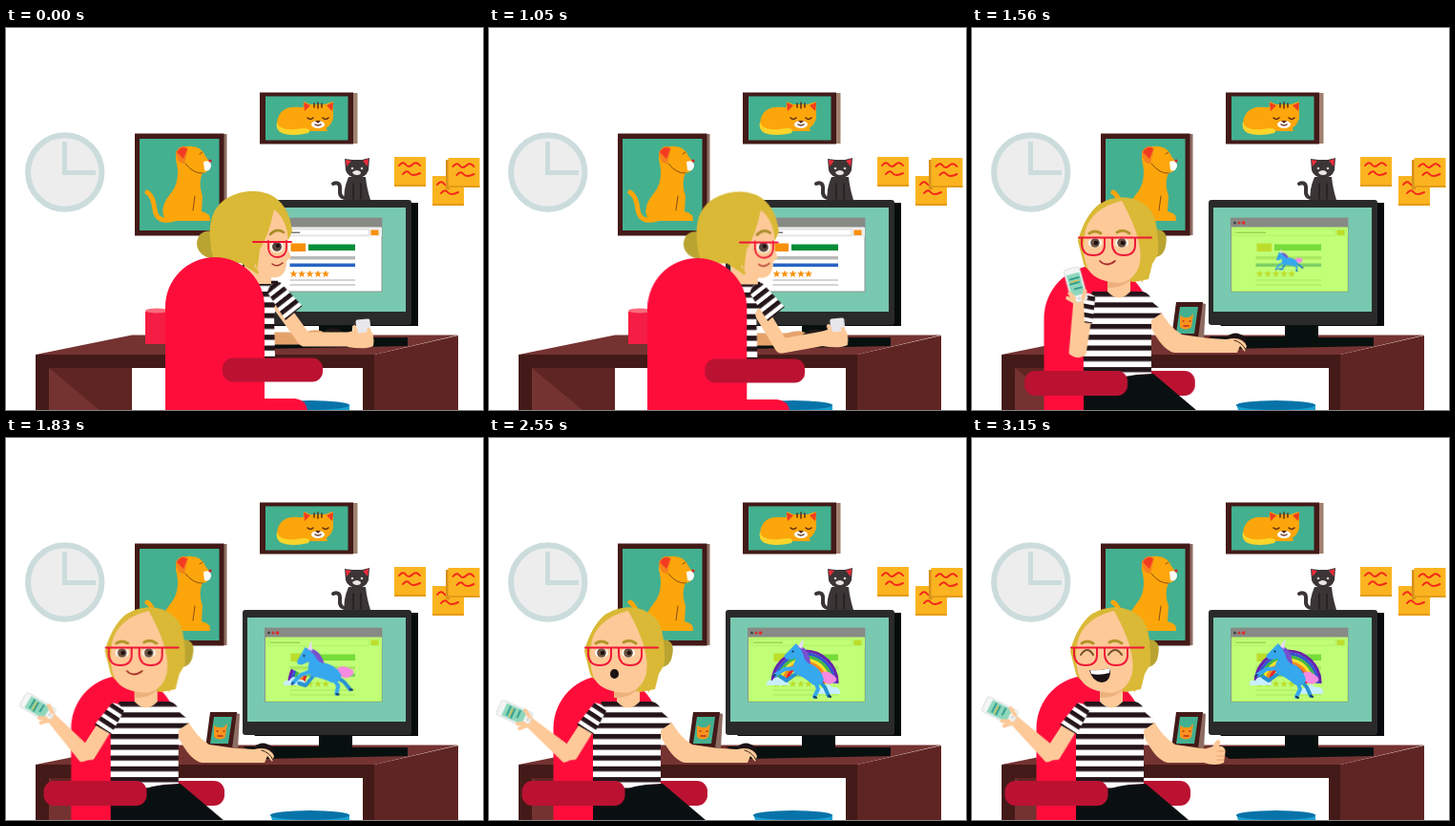
Write an HTML page that moves like this. It is 500 px wide and 400 px high and loops after 4500 ms.

```html
<!DOCTYPE html>
<html lang="en">
<head>
<meta charset="utf-8">
<title>Desk surprise</title>
<style>
html, body { margin: 0; width: 100%; height: 100%; overflow: hidden; background: #fff; }
svg { display: block; width: 100vw; height: 100vh; }
.anim { animation: 4.5s linear infinite; }
.line { fill: none; stroke-linecap: round; stroke-linejoin: round; }
.skin { fill: #fdc998; }
.limb { stroke: #fdc998; }
.hair { fill: #d9b936; }
.red { fill: #fe0d3b; }
.rest { fill: #bb1232; }
.ink { fill: #1b1215; }
.cut { animation-timing-function: step-end; }

/* typing, seen from behind */
.back { animation-name: back; }
@keyframes back {
  0%, 26.66% { opacity: 1 }
  26.67%, 100% { opacity: 0 }
}
.backChair { animation-name: backChair; }
@keyframes backChair {
  0% { transform: none; animation-timing-function: ease-in-out }
  12%, 20.67% { transform: translate(3.5px, 0); animation-timing-function: ease-in }
  23.33% { transform: translate(-.5px, 1px) }
  26.67%, 100% { transform: translate(-29px, 1px) }
}
.backHead { animation-name: backHead; }
@keyframes backHead {
  0% { transform: none; animation-timing-function: ease-in-out }
  13%, 20.67% { transform: translate(7px, 0); animation-timing-function: ease-in }
  23.33% { transform: translate(4px, .5px) }
  26.67%, 100% { transform: translate(-25px, 1px) }
}
.backArm { animation-name: backArm; }
@keyframes backArm {
  0% { d: path("M289 293 L313 326 L366 326"); animation-timing-function: ease-in-out }
  13.33%, 20.67% { d: path("M292 300 L309 333 L362 327"); animation-timing-function: ease-in }
  23.33% { d: path("M287 300 L307 333 L357 324") }
  26.67%, 100% { d: path("M257 300 L277 333 L327 324") }
}
.backHand { animation-name: backHand; }
@keyframes backHand {
  0% { transform: none; animation-timing-function: ease-in-out }
  13.33%, 20.67% { transform: translate(-3px, 1px) }
  23.33% { transform: translate(-9px, -1px) }
  26.67%, 100% { transform: translate(-39px, -1px) }
}

/* facing the room */
.front { animation-name: front; }
@keyframes front {
  0%, 26.66% { opacity: 0 }
  26.67%, 100% { opacity: 1 }
}
.frontBody { animation-name: frontBody; }
@keyframes frontBody {
  0%, 26.67% { transform: translateX(70px) }
  29.33% { transform: translateX(27px) }
  32% { transform: translateX(14px) }
  36% { transform: translateX(5px) }
  40.67% { transform: translateX(.7px) }
  44%, 100% { transform: none }
}
.frontRest { animation-name: frontRest; }
@keyframes frontRest {
  0%, 26.67% { transform: translateX(115px) }
  29.33% { transform: translateX(57px) }
  32% { transform: translateX(32px) }
  36% { transform: translateX(15px) }
  40.67% { transform: translateX(5px) }
  44%, 100% { transform: none }
}
.farRest { animation-name: farRest; }
@keyframes farRest {
  0%, 26.67% { transform: translateX(30px) }
  29.33% { transform: translateX(9px) }
  40.67%, 100% { transform: none }
}
.deskArm { animation-name: deskArm; }
@keyframes deskArm {
  0%, 26.67% { transform: translateX(50px) }
  29.33% { transform: translateX(18px) }
  32% { transform: translateX(10px) }
  40.67%, 100% { transform: none }
}
.head { animation-name: head; }
@keyframes head {
  0%, 40.67% { transform: none }
  46%, 58% { transform: translateX(-3px) }
  66%, 100% { transform: none }
}
.upper { animation-name: upper; }
@keyframes upper {
  0%, 30.67% { transform: rotate(-10deg); animation-timing-function: ease-in-out }
  39%, 100% { transform: rotate(33deg) }
}
.fore { animation-name: fore; }
@keyframes fore {
  0%, 30.67% { transform: rotate(205deg); animation-timing-function: ease-in-out }
  40.67% { transform: rotate(105deg) }
  44%, 56.67% { transform: rotate(98deg) }
  66%, 100% { transform: rotate(101deg) }
}
.smile { animation-name: smile; }
@keyframes smile { 0% { opacity: 1 } 46.67%, 100% { opacity: 0 } }
.gasp { animation-name: gasp; }
@keyframes gasp { 0% { opacity: 0 } 46.67% { opacity: 1 } 60%, 100% { opacity: 0 } }
.laugh { animation-name: laugh; }
@keyframes laugh { 0% { opacity: 0 } 60%, 100% { opacity: 1 } }
.open { animation-name: open; }
@keyframes open { 0% { opacity: 1 } 60%, 100% { opacity: 0 } }
.flat { animation-name: flat; }
@keyframes flat { 0% { opacity: 1 } 64.4%, 100% { opacity: 0 } }
.fist { animation-name: fist; }
@keyframes fist { 0% { opacity: 0 } 64.4%, 100% { opacity: 1 } }
.thumb { animation-name: thumb; }
@keyframes thumb {
  0%, 68% { transform: translateY(8px) }
  70%, 100% { transform: none }
}

/* on the screen */
.tint { animation-name: tint; }
@keyframes tint { 0%, 24.67% { opacity: 0 } 27.5%, 100% { opacity: .7 } }
.unicorn { animation-name: unicorn; transform-origin: 332px 245px; }
@keyframes unicorn {
  0%, 33% { transform: rotate(-30deg) scale(0); animation-timing-function: ease-out }
  38.5% { transform: rotate(-18deg) scale(1) }
  40.67% { transform: rotate(-15deg) }
  48% { transform: rotate(2deg) }
  56.67% { transform: translateX(1px) rotate(0deg) }
  62% { transform: translateY(-1px) rotate(-3deg) }
  68%, 100% { transform: none }
}
.bow { animation-name: bow; stroke-dasharray: 1 2; }
@keyframes bow {
  0%, 39% { stroke-dashoffset: 1.01 }
  40.67% { stroke-dashoffset: .86 }
  48%, 100% { stroke-dashoffset: 0 }
}
.cloud { animation-name: cloud; }
@keyframes cloud { 0%, 38.5% { opacity: 0 } 40.67%, 100% { opacity: 1 } }
.late { animation-name: late; }
@keyframes late { 0%, 46% { opacity: 0 } 48%, 100% { opacity: 1 } }
</style>
</head>
<body>
<svg viewBox="0 0 500 400" preserveAspectRatio="none">
<defs>
  <pattern id="stripes" width="20" height="11.3" y="276" patternUnits="userSpaceOnUse">
    <rect width="20" height="11.3" fill="#fff"/><rect width="20" height="5.3" fill="#24151a"/>
  </pattern>
  <pattern id="cuff" width="30" height="9" y="-8" patternUnits="userSpaceOnUse">
    <rect width="30" height="9" fill="#fff"/><rect width="30" height="4.8" fill="#24151a"/>
  </pattern>
  <path id="star" d="M0-4 1.1-1.3 4-1.2 1.7.6 2.5 3.5 0 1.8-2.5 3.5-1.7.6-4-1.2-1.1-1.3Z"/>
  <g id="note">
    <rect width="33" height="31" fill="#fbb41f"/><path d="M0 29H33V31H0Z" fill="#e59a17"/>
    <path class="line" stroke="#f3261b" stroke-width="2" d="M5 9Q9 4 12 8T19 8T27 9M9 18Q13 13 16 17T27 17"/>
  </g>
</defs>

<!-- wall -->
<circle cx="61.7" cy="151" r="38.7" fill="#ededed" stroke="#ccdcdc" stroke-width="6"/>
<path d="M61.5 119V151.500H94" fill="none" stroke="#ccdcdc" stroke-width="5"/>

<path d="M228 111H231.500V217H228Z" fill="#8d6c62"/>
<path d="M135 110.500H228.500V217.500H135Z" fill="#431a18"/>
<path d="M140 116H223.500V212H140Z" fill="#43b090"/>
<g fill="#fca60b">
  <path class="line" stroke="#fca60b" stroke-width="5" d="M176 200Q158 205 156 190T148 172"/>
  <path d="M178 138Q177 126 189 124Q204 122 209 134L214 141Q216 150 206 152Q201 162 206 176L205 192Q215 194 214 202H168Q159 190 172 174Q184 160 178 138Z"/>
  <path d="M178 130Q184 120 191 126L187 142Q179 143 178 130Z" fill="#f5811d"/>
  <path d="M179 130Q185 122 190 127L186 137Z" fill="#f33b22"/>
</g>
<path d="M207 140Q215 137 215 145Q213 151 208 149Z" fill="#fff"/>
<path class="line" stroke="#8c4a12" d="M203 132 206 130M188 142Q197 153 206 152M198 176 196 191"/>
<circle cx="214" cy="139" r="1.6" fill="#d8232a"/>

<path d="M363 68H368.500V121H363Z" fill="#a0806f"/>
<path d="M266 67.500H364V121.500H266Z" fill="#431a18"/>
<path d="M272 71.500H358.500V117.500H272Z" fill="#43b090"/>
<path d="M284 104Q283 80 309 83Q330 83 337 108H297Q286 112 284 104Z" fill="#fca60b"/>
<path d="M284 98Q286 108 304 106Q322 103 317 110Q300 114 289 110Q282 106 284 98Z" fill="#fbd52a"/>
<path d="M311 90 312 77 319 80H334L343 77 343 94Q340 107 326 107Q312 105 311 90Z" fill="#fca60b"/>
<path d="M312 78 319 81 313 87ZM343 78 336 81 342 87Z" fill="#f33b22"/>
<ellipse cx="327" cy="101" rx="7" ry="4" fill="#fff"/>
<path class="line" stroke="#5b2913" stroke-width="1.5" d="M323 79V83M327 78V84M331 79V83M316 94Q319 97 322 94M332 94Q335 97 338 94M324 101Q327 103 330 101"/>
<path d="M324 97H330L327 100Z" fill="#5b2913"/>

<use href="#note" x="407" y="135"/>
<use href="#note" x="447" y="155"/>
<path d="M461 138H465V169H461Z" fill="#d7901b"/>
<use href="#note" x="463.500" y="136"/>

<!-- desk -->
<path d="M31 342 132 321.500H474L386 342Z" fill="#743331"/>
<path d="M31 342H386V400H374V356H45V400H31Z" fill="#431a18"/>
<path d="M45 356H132V400H45ZM386 342 474 322V400H386Z" fill="#5f2522"/>
<path d="M45 356 98 400H45Z" fill="#743331"/>
<path d="M146 297H170V331H146Z" fill="#f51d43"/>
<ellipse cx="158" cy="296" rx="12" ry="2.500" fill="#fb6b7c"/>
<path d="M277 394H360V400H279Z" fill="#1aa0d0"/>
<ellipse cx="318.500" cy="395" rx="41.500" ry="5" fill="#0873a8"/>

<!-- monitor -->
<path d="M424 183H432V312H260Z" fill="#070b0b"/>
<path d="M328 310H363V324H421V333L270 336 248 323H328Z" fill="#07100f"/>
<rect x="248" y="180" width="177" height="131" rx="3" fill="#2a2a2a"/>
<path d="M253 188H419V297H253Z" fill="#78c9b0"/>
<rect x="271.500" y="199" width="122.500" height="77" fill="#fff" stroke="#8a9690"/>
<path d="M272 209H394V218.500H272Z" fill="#eee"/>
<path d="M276 211H380V217H276Z" fill="#fff" stroke="#ccc" stroke-width=".6"/>
<path d="M277 213.500H308V215H277Z" fill="#777"/>
<path d="M298.500 225.500H314V234H298.500ZM382.500 211.500H390.500V217H382.500Z" fill="#f8900a"/>
<path d="M317 226.500H366V233H317Z" fill="#068d38"/>
<path d="M297.500 239H366V242.500H297.500Z" fill="#b8b8b8"/>
<path d="M297.500 246.500H366V250H297.500Z" fill="#2863c4"/>
<path d="M297.500 263H366V265H297.500ZM297.500 268H366V270H297.500Z" fill="#d4d4d4"/>
<g fill="#f8900a">
  <use href="#star" x="301.500" y="257.500"/><use href="#star" x="310" y="257.500"/><use href="#star" x="318.500" y="257.500"/><use href="#star" x="327" y="257.500"/><use href="#star" x="335" y="257.500"/>
</g>
<path class="anim tint" d="M272 208H394V276H272Z" fill="#a5ff3c"/>
<path d="M271 199H394V208.500H271Z" fill="#878a85"/>
<circle cx="275.500" cy="204" r="1.500" fill="#444"/><circle cx="280" cy="204" r="1.500" fill="#c33"/><circle cx="284.500" cy="204" r="1.700" fill="#e22"/>

<g class="line" stroke-width="3.200" style="stroke-linecap:butt">
  <path class="anim bow" pathLength="1" stroke="#6a20b0" d="M297 257A34 34 0 0 1 365 257"/>
  <path class="anim bow" pathLength="1" stroke="#3553d4" d="M300 257A31 31 0 0 1 362 257"/>
  <path class="anim bow" pathLength="1" stroke="#42b749" d="M303 257A28 28 0 0 1 359 257"/>
  <path class="anim bow" pathLength="1" stroke="#f5e22b" d="M306 257A25 25 0 0 1 356 257"/>
  <path class="anim bow" pathLength="1" stroke="#f68b1f" d="M309 257A22 22 0 0 1 353 257"/>
  <path class="anim bow" pathLength="1" stroke="#e8262b" d="M312 257A19 19 0 0 1 350 257"/>
</g>
<path class="anim cloud" fill="#c8efff" d="M291 259Q290 253 297 254Q301 247 307 253Q315 252 314 259Z"/>
<path class="anim late" fill="#c8efff" d="M344 268Q342 262 349 262Q355 255 360 261Q369 260 368 268Z"/>
<g class="anim unicorn">
  <path fill="#f58ae0" d="M344 250Q350 241 358 247Q367 252 361 256Q355 260 350 255Z"/>
  <g class="line" stroke="#2590d3" stroke-width="4">
    <path d="M322 246 311 254 305 250M345 254 351 261 355 270"/>
  </g>
  <g class="line" stroke="#35a8ee" stroke-width="4">
    <path d="M321 241 309 242 299 248M341 255 344 263 340 271"/>
  </g>
  <path fill="#35a8ee" d="M309 227 318 218 321 215 324 219Q333 224 333 235Q347 240 350 253Q347 262 338 258Q329 250 320 247Q315 241 321 231L313 232Q307 231 309 227Z"/>
  <path fill="#7750cf" d="M322 217Q335 219 336 237Q331 235 329 229Q328 223 322 217Z"/>
  <path fill="#e7d8ff" d="M323 218 329 210 327 221Z"/>
  <circle cx="317.500" cy="223.500" r="1" fill="#123"/>
  <path class="line" stroke="#123a66" stroke-width="2" d="M299 248 297.500 249M340 271 342 272M355 270 357 271"/>
</g>

<!-- toy cat on the monitor -->
<path class="line" stroke="#3b3536" stroke-width="4" d="M361 178Q349 180 350 170T343 163"/>
<path fill="#3b3536" d="M359 156H377Q378 167 382 180H355Q353 170 359 156Z"/>
<path fill="#3b3536" d="M355 137 363 138H373L381 136 380 149Q377 157 368 157Q358 156 356 149Z"/>
<path fill="#ee2b3a" d="M356 138 362 139 357 145ZM380 137 374 139 379 145Z"/>
<path fill="#ece7e5" d="M363 151Q368 147 372 151Q372 154 368 154T363 151Z"/>
<circle cx="363" cy="147" r="1.300" fill="#d8d0c8"/><circle cx="373" cy="147" r="1.300" fill="#d8d0c8"/>
<path class="line" stroke="#171314" d="M364 163V179M372 163V179"/>

<!-- photo on the desk -->
<path d="M241 288 245 289 243 326 236 323Z" fill="#8d6c62"/>
<path d="M214 287H242L237 325H209Z" fill="#431a18"/>
<path d="M218 292H237L233 320H214Z" fill="#43b090"/>
<path d="M218 301 222 303H228L232 299 230 313Q224 318 218 313Z" fill="#f7941d"/>
<path class="line" stroke="#c2281c" stroke-width="1.300" d="M221 307H222M228 307H229M222 312H227"/>

<!-- back view -->
<g class="anim cut back">
  <g class="anim backChair">
    <path class="line" stroke="#e5a36c" stroke-width="13" d="M276 325H314"/>
    <path class="line" stroke="#e5a36c" stroke-width="7" d="M314 322Q326 317 334 323"/>
    <path class="line" stroke="#241a18" stroke-width="3" d="M331 321Q342 312 352 319"/>
    <path fill="url(#stripes)" d="M262 264 284 262Q290 278 281 300L282 346H262Z"/>
  </g>
  <path class="line limb anim backArm" stroke-width="15" d="M289 293 L313 326 L366 326"/>
  <g class="anim backHand">
    <path class="skin" d="M358 319 369 315 381 315Q387 322 385 333Q377 337 358 334Z"/>
    <rect x="367" y="305" width="15" height="14" rx="2" fill="#e7e7ec" transform="rotate(-6 374 312)"/>
    <path class="line limb" stroke-width="4" d="M365 313 368 321M380 316 383 323"/>
  </g>
  <g class="anim backChair">
    <g transform="translate(284 275) rotate(-38)"><path fill="url(#cuff)" d="M-9-5Q0-12 8-5L11 29-12 30Z"/></g>
  </g>
  <g class="anim backHead">
    <path fill="#b9a431" d="M219 213Q201 210 200 226Q201 239 218 242Z"/>
    <path class="skin" d="M250 235H278V268H250Z"/>
    <path class="hair" d="M214 222Q211 190 232 178Q254 166 276 174Q297 184 300 213L296 222 286 210 264 258 246 246H221Q215 240 214 222Z"/>
    <path class="skin" d="M281 190Q291 197 295 214L296 233 299 240 294 244Q294 259 284 261Q271 263 264 254Q255 246 261 228Q269 216 281 190Z"/>
    <path class="hair" d="M266 200Q252 224 257 253L262 247 263 256 266 232Q276 215 281 190Z"/>
    <path class="line" stroke="#a88d28" stroke-width="2.500" d="M277 216Q284 209 291 214"/>
    <ellipse cx="284" cy="229" rx="7" ry="6" fill="#fff"/>
    <circle cx="284" cy="229" r="5" fill="#574239"/><circle cx="285" cy="228" r="2" class="ink"/>
    <path class="line" stroke="#ef1738" stroke-width="1.800" d="M259 224H299M275 223V231Q276 240 285 240Q294 239 294 230V223"/>
    <path class="line" stroke="#a9302b" stroke-width="1.600" d="M279 247Q284 251 290 246"/>
  </g>
  <g class="anim backChair">
    <path class="red" d="M167 400V292A52 52 0 0 1 271 292V388H303Q314 389 316 400Z"/>
    <rect class="rest" x="227" y="345.500" width="105" height="25" rx="11"/>
  </g>
</g>

<!-- front view -->
<g class="anim cut front">
  <g class="anim farRest"><rect class="rest" x="158" y="359" width="71" height="26" rx="11"/></g>
  <g class="anim frontBody">
    <path class="red" d="M67.500 400V304A55.500 55.500 0 0 1 178.500 304V400Z"/>
    <path fill="#0a1011" d="M109 374Q140 362 182 362L227 400H109Z"/>
  </g>
  <g class="anim deskArm">
    <path class="skin" d="M175 294 189 293Q199 313 213 321L248 326V340H205Q190 337 175 301Z"/>
    <g class="anim cut flat">
      <path class="ink" d="M258 326Q267 314 280 324V333H258Z"/>
      <path class="skin" d="M243 325 260 326Q276 322 281 333L279 339 274 333 271 340H243Z"/>
      <path class="line" stroke="#33201b" d="M268 327Q276 329 280 337"/>
    </g>
    <g class="anim cut fist">
      <path class="skin anim thumb" d="M251 331Q253 316 259 316Q262 318 258 325L260 334Z"/>
      <path class="skin" d="M243 326 252 323H262Q267 325 265 332L264 340Q255 344 243 340Z"/>
      <path class="line" stroke="#e5a36c" d="M257 328H265M257 333H265M257 337H264"/>
    </g>
  </g>
  <g class="anim frontBody">
    <path class="skin" d="M134 256H158V286H134Z"/>
    <path fill="url(#stripes)" d="M118 276H134Q146 289 158 276H171Q178 277 182 288L193 297 180 306V362Q146 363 138 372H109V300Z"/>
    <g class="anim head">
      <path fill="#b9a431" d="M183 211Q199 210 195 228Q193 240 182 240Z"/>
      <path class="hair" d="M103 223Q112 190 132 181Q158 171 177 188Q188 199 187 237L181 247 177 263 162 266Q112 259 109 247Z"/>
      <path fill="#edb17e" d="M134 255H158V264Q148 273 134 272Z"/>
      <path class="skin" d="M149 181Q162 190 170 217L169 242Q165 264 147 267Q122 266 114 253Q106 237 111 211Q119 188 149 181Z"/>
      <path class="hair" d="M150 179Q116 184 111 212L103 223Q112 194 126 184ZM149 181Q170 180 178 199V250L170 267 168 246Q172 222 149 181Z"/>
      <path class="line" stroke="#b29429" stroke-width="3" d="M115 215Q121 211 127 215M144 214Q150 210 157 215"/>
      <g class="anim cut open">
        <ellipse cx="121" cy="225" rx="7" ry="5" fill="#fff"/><ellipse cx="149" cy="225" rx="7" ry="5" fill="#fff"/>
        <circle cx="121" cy="225" r="4.800" fill="#6d513e"/><circle cx="149" cy="225" r="4.800" fill="#6d513e"/>
        <circle cx="122" cy="225" r="2.300" class="ink"/><circle cx="150" cy="225" r="2.300" class="ink"/>
      </g>
      <path class="line anim cut laugh" stroke="#76502c" stroke-width="2" d="M114 227Q121 217 127 227M143 227Q150 217 157 227"/>
      <path class="line" stroke="#ef1738" stroke-width="2" d="M104 219.500H180M107 220V227Q108 238 119 238Q131 238 131 227V220M139 220V227Q140 238 151 238Q163 238 163 227V220"/>
      <path class="line anim cut smile" stroke="#a9302b" stroke-width="1.700" d="M126 244Q133 251 142 244"/>
      <ellipse class="anim cut gasp ink" cx="134.500" cy="247" rx="4.500" ry="5"/>
      <g class="anim cut laugh">
        <path class="ink" d="M123 243Q134 244 145 241Q146 255 136 256Q126 255 123 243Z"/>
        <path d="M124 243Q134 244 145 241L144 246Q134 249 125 247Z" fill="#fff"/>
      </g>
    </g>
  </g>
  <g class="anim frontRest"><rect class="rest" x="34.500" y="359" width="108" height="26" rx="11"/></g>
  <g class="anim frontBody">
    <g transform="translate(112 288)"><g class="anim upper">
      <path class="skin" d="M-8 10H8L9 52Q1 61-8 52Z"/>
      <path fill="url(#cuff)" d="M-7-8Q0-13 8-8L10 20-10 21Z"/>
      <g transform="translate(0 53)"><g class="anim fore">
        <path class="skin" d="M-9-1Q-1-9 9-1L6 52Q11 63 5 70L-6 66-5 52Z"/>
        <g transform="translate(4 71) rotate(-107)">
          <rect x="-18" y="-8.500" width="36" height="17" rx="2.500" fill="#f4f5f5" stroke="#d4dada" stroke-width=".8"/>
          <rect x="-12" y="-7" width="23" height="14" fill="#8ed7bd"/>
          <path d="M-7-6V5M-2-5V6M4-6V3" stroke="#2c9a86" stroke-width="1.800"/>
          <path d="M-4-4V5" stroke="#f8b21e" stroke-width="1"/>
          <circle cx="14.500" r="1.500" fill="#cfd5d5"/>
        </g>
        <path class="line limb" stroke-width="4" d="M-4 57-6 65M5 57 10 62M4 53 12 57"/>
      </g></g>
    </g></g>
  </g>
</g>
</svg>
</body>
</html>
```
